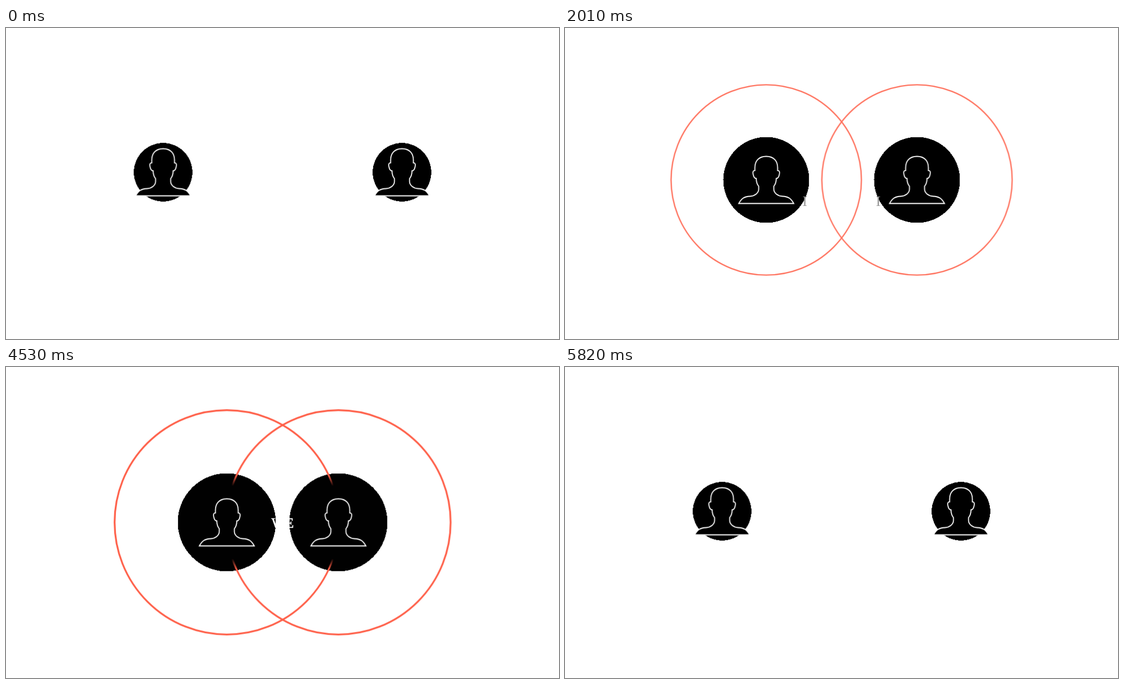
Animation, 997 px wide and 561 px high, one loop 5.85 s. Source, as an HTML page:

```html
<!DOCTYPE html>
<html lang="en">
<head>
<meta charset="utf-8">
<title>We</title>
<style>
  html, body { margin: 0; width: 100%; height: 100%; overflow: hidden; background: #fff; }
  svg { display: block; width: 100vw; height: 100vh; }

  .l { --from: 283.3px; --to: 398.1px; --mid: 498.5px; }
  .r { --from: 713.9px; --to: 599.3px; --mid: 498.5px; }

  .stage, .scene, .move, .disc, .shade, .ring, .slide, .i, .we {
    animation-duration: 5850ms;
    animation-iteration-count: infinite;
    animation-timing-function: linear;
  }
  .stage { fill: #fff; animation-name: flip; }
  .scene { animation-name: dip; }
  .move { animation-name: move; }
  .disc { shape-rendering: crispEdges; animation-name: disc; }
  .shade { fill: url(#fade); animation-name: disc; }
  .ring { fill: none; animation-name: ring, tint; }
  .person { fill: #000; stroke: #fff; stroke-width: 1.8; stroke-linejoin: miter; }
  .slide { animation-name: slide; }
  .i { animation-name: leave; }
  .we { fill: #fff; stroke: #fff; stroke-width: .6; animation-name: enter; }
  text { font: 26px "Liberation Serif", "Times New Roman", serif; text-anchor: middle; }

  /* 930 ms = 15.897%, 2730 ms = 46.667%, 5175 ms = 88.462% */
  @keyframes move {
    0% { transform: translate(var(--from), 260.2px); }
    15.897% { transform: translate(var(--from), 260.2px); animation-timing-function: cubic-bezier(.38, 0, .57, 1); }
    46.667%, 88.46% { transform: translate(var(--to), 280.2px); }
    88.47%, 100% { transform: translate(var(--from), 260.2px); }
  }
  @keyframes slide {
    0% { transform: translate(var(--from), 382px); }
    15.897% { transform: translate(var(--from), 382px); animation-timing-function: cubic-bezier(.38, 0, .57, 1); }
    46.667%, 88.46% { transform: translate(var(--mid), 281.5px); }
    88.47%, 100% { transform: translate(var(--from), 382px); }
  }
  @keyframes disc {
    0% { r: 52.8px; }
    15.897% { r: 52.8px; animation-timing-function: cubic-bezier(.38, 0, .57, 1); }
    46.667%, 88.46% { r: 88.5px; }
    88.47%, 100% { r: 52.8px; }
  }
  @keyframes ring {
    0% { r: 102.5px; stroke-width: .6px; }
    15.897% { r: 102.5px; stroke-width: .6px; animation-timing-function: cubic-bezier(.38, 0, .57, 1); }
    46.667%, 88.46% { r: 202.3px; stroke-width: 3.2px; }
    88.47%, 100% { r: 102.5px; stroke-width: .6px; }
  }
  @keyframes tint {
    0%, 15.897% { stroke: #fff; }
    28.205% { stroke: #ff9585; }
    34.359% { stroke: #ff7460; }
    46.667%, 88.46% { stroke: #ff5e47; }
    88.47%, 100% { stroke: #fff; }
  }
  @keyframes leave {
    0%, 29.74% { fill: #fff; opacity: 1; }
    34.359% { fill: #999; opacity: 1; }
    35.9% { fill: #808080; opacity: 1; }
    35.91%, 88.46% { fill: #808080; opacity: 0; }
    88.47%, 100% { fill: #fff; opacity: 1; }
  }
  @keyframes enter {
    0%, 35.9% { opacity: 0; }
    42%, 88.46% { opacity: 1; }
    88.47%, 100% { opacity: 0; }
  }
  @keyframes dip {
    0% { opacity: 1; }
    77.436% { opacity: 1; animation-timing-function: cubic-bezier(.7, 0, .4, 1); }
    88.462% { opacity: 0; animation-timing-function: cubic-bezier(.6, 0, .3, 1); }
    99.487%, 100% { opacity: 1; }
  }
  @keyframes flip {
    0%, 77.94% { fill: #fff; }
    77.949%, 97.42% { fill: #000; }
    97.43%, 100% { fill: #fff; }
  }
</style>
</head>
<body>
<svg viewBox="0 0 997 561" preserveAspectRatio="none">
  <defs>
    <radialGradient id="fade">
      <stop offset=".75"/>
      <stop offset=".97" stop-opacity="0"/>
    </radialGradient>
    <path id="person" d="M0-42.5
      C-14-42.5-20.5-33.5-20.5-22 V-17
      C-24-17-24.6-14-23.6-10 C-22.6-5-21-2.5-18-2.5
      C-18 4-16.5 8-13.6 11.5 V17
      C-14 24-21 29-29 29.5 C-40 30-44.5 33.5-49.5 42.5
      H49.5 C44.5 33.5 40 30 29 29.5 C21 29 14 24 13.6 17
      V11.5 C16.5 8 18 4 18-2.5
      C21-2.5 22.6-5 23.6-10 C24.6-14 24-17 20.5-17
      V-22 C20.5-33.5 14-42.5 0-42.5Z"/>
  </defs>

  <rect class="stage" width="997" height="561"/>
  <g class="scene">
    <g class="move l"><circle class="disc"/></g>
    <g class="move r"><circle class="disc"/></g>
    <g class="move l"><circle class="ring"/></g>
    <g class="move r"><circle class="ring"/></g>
    <g class="move l"><circle class="shade"/><use class="person" href="#person"/></g>
    <g class="move r"><circle class="shade"/><use class="person" href="#person"/></g>
    <g class="slide l"><text class="i" y="8.7">I</text></g>
    <g class="slide r"><text class="i" y="8.7">I</text></g>
    <text class="we" x="498.6" y="290.4">WE</text>
  </g>
</svg>
</body>
</html>
```
